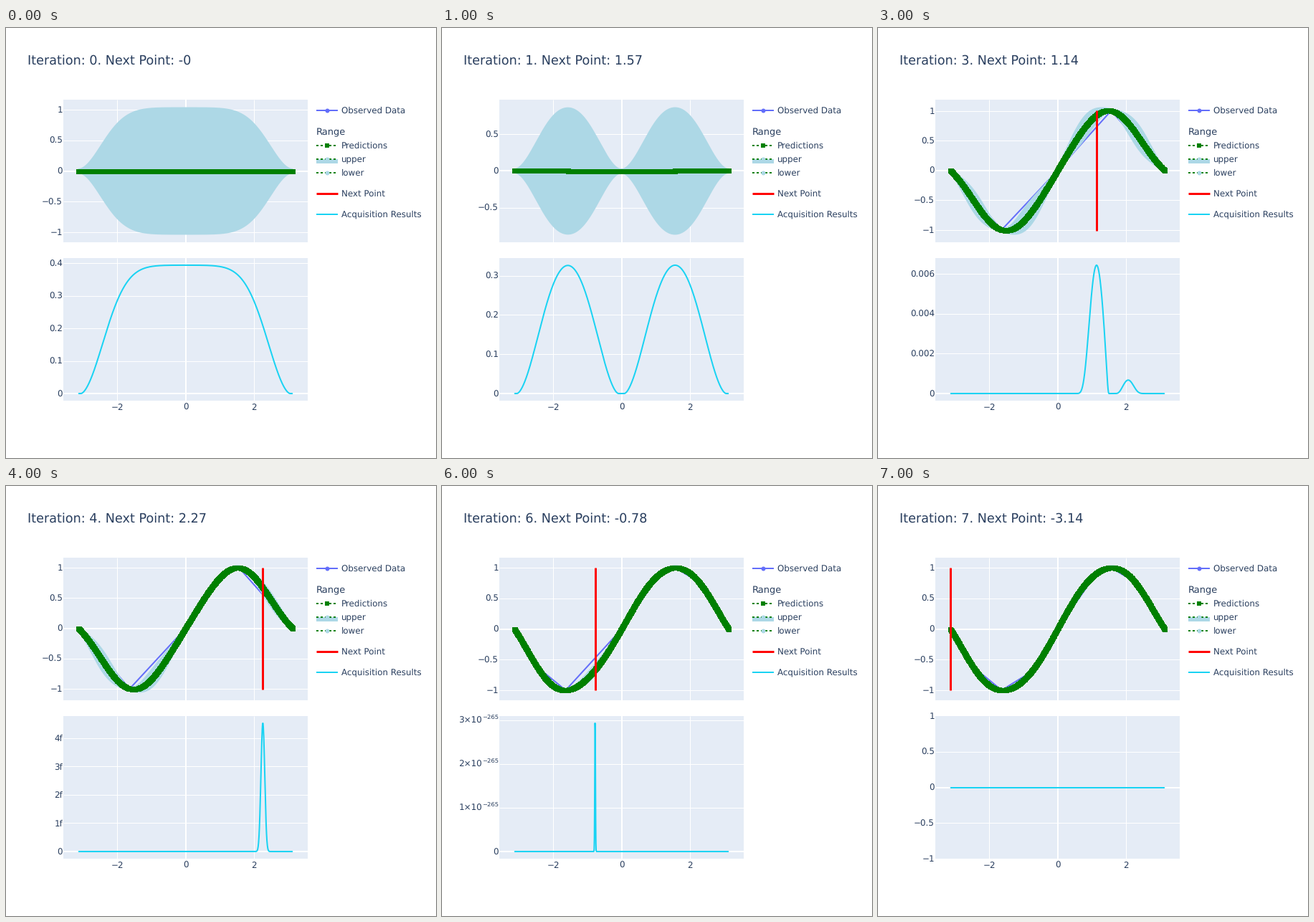
A matplotlib script for the animation above (8000 ms loop, 600 by 600 pixels).

```python
import math

import matplotlib.pyplot as plt
import numpy as np
from matplotlib.animation import FuncAnimation
from matplotlib.patches import Rectangle

plt.rcParams["font.family"] = "DejaVu Sans"
plt.rcParams["text.hinting"] = "none"

SIZE, DPI = 600, 100
PT = 72 / DPI  # points per pixel
STEPS = 8
INK, PANEL = "#2a3f5f", "#e5ecf6"
BLUE, BAND, GREEN, CYAN = "#636efa", "#add8e6", "#008000", "#19d3f3"
LEFT, RIGHT, HEIGHT = 80, 421, 199
TOP_A, TOP_B = 100, 321
MARKER = 7
XS = np.linspace(-math.pi, math.pi, 1000)
SI = {-6: "μ", -9: "n", -12: "p", -15: "f"}

erfc = np.vectorize(math.erfc)


# --- Bayesian optimisation of sin(x) ---

def kernel(a, b):
    return np.exp(-0.5 * (a[:, None] - b[None, :]) ** 2)


def posterior(x, y):
    k = kernel(x, x) + 1e-10 * np.eye(len(x))
    cross = kernel(x, XS)
    solved = np.linalg.solve(k, cross)
    return solved.T @ y, np.maximum(1 - (cross * solved).sum(axis=0), 1e-12)


def expected_improvement(mean, spread, best, xi=0.01):
    gain = mean - best - xi
    z = gain / spread
    pdf = np.exp(-0.5 * z ** 2) / math.sqrt(2 * math.pi)
    ei = gain * 0.5 * erfc(-z / math.sqrt(2)) + spread * pdf
    return np.where(ei > 1e-305, ei, 0)


def optimise():
    x = np.array([-math.pi, math.pi])
    steps = []
    for _ in range(STEPS):
        y = np.sin(x)
        mean, spread = posterior(x, y)
        ei = expected_improvement(mean, spread, y.max())
        nxt = XS[np.argmax(ei)]
        steps.append((x, y, mean, spread, ei, nxt))
        x = np.sort(np.append(x, nxt))
    return steps


# --- drawing, in pixels with y pointing down ---

fig = plt.figure(figsize=(SIZE / DPI, SIZE / DPI), dpi=DPI, facecolor="white")
ax = fig.add_axes([0, 0, 1, 1])


def px(x):
    return 250.5 + 47.59 * np.asarray(x)


def line(x, y, color, width, z, **kw):
    return ax.plot(x, y, color=color, lw=width * PT, zorder=z,
                   solid_capstyle="butt", dash_capstyle="butt", **kw)[0]


def dots(x, y, color, shape, size, z):
    mark = ax.plot(x, y, shape, color=color, ms=size * PT, mew=0, zorder=z)[0]
    mark.set_snap(False)


def text(x, y, s, size=11.85, ha="left"):
    ax.text(x, y, s, fontsize=size * PT, color=INK, ha=ha, va="baseline",
            zorder=9)


def rect(x, y, w, h, color, z):
    ax.add_patch(Rectangle((x, y), w, h, fc=color, lw=0, zorder=z))


class YAxis:
    """Maps values to pixels with automatic range and ticks."""

    def __init__(self, top, lo, hi, pad):
        self.bottom = top + HEIGHT
        if hi > lo:
            self.scale = (HEIGHT - 2 * pad) / (hi - lo)
            self.lo = lo - pad / self.scale
        else:
            self.scale, self.lo = HEIGHT / 2, -1.0
        self.hi = self.lo + HEIGHT / self.scale

    def __call__(self, y):
        return self.bottom - (np.asarray(y) - self.lo) * self.scale

    def ticks(self):
        rough = (self.hi - self.lo) / (HEIGHT / 40 + 1)
        base = 10.0 ** math.floor(math.log10(rough))
        step = base * next(m for m in (2, 5, 10) if m * base >= rough)
        first = math.ceil(self.lo / step - 1e-9)
        last = math.floor(self.hi / step + 1e-9)
        return [i * step for i in range(first, last + 1)]

    def label(self, v):
        y = float(self(v)) + 4.3
        power = math.floor(math.log10(max(-self.lo, self.hi)) + 0.01)
        if v == 0 or abs(power) <= 3:
            s = f"{round(v, 8):g}".replace("-", "−")
            text(79, y, s, ha="right")
        elif power >= -15:
            power = 3 * round((power - 1) / 3)
            text(79, y, f"{v / 10.0 ** power:.4g}{SI[power]}", ha="right")
        else:
            digits = str(-power)
            small = 8.4
            text(79, y - 5, "−" + digits, small, "right")
            width = small * (0.838 + 0.636 * len(digits))
            text(79 - width, y, f"{v / 10.0 ** power:.4g}×10", ha="right")

    def draw(self):
        rect(LEFT, self.bottom - HEIGHT, RIGHT - LEFT, HEIGHT, PANEL, 0)
        for x in (-2, 0, 2):
            line([px(x)] * 2, [self.bottom - HEIGHT, self.bottom], "white",
                 1 if x else 2, 1)
        for v in self.ticks():
            y = float(self(v))
            if self.bottom - HEIGHT + 1 < y < self.bottom - 1:
                line([LEFT, RIGHT], [y, y], "white", 1 if v else 2, 1)
            self.label(v)


def legend():
    ends = [433, 463]
    rows = [(114.5, "Observed Data"), (163.5, "Predictions"), (182.5, "upper"),
            (201.5, "lower"), (230.5, "Next Point"),
            (259.5, "Acquisition Results")]
    for y, name in rows:
        text(468, y + 4.5, name)
    text(433, 149.5, "Range", 13)

    line(ends, [114.5] * 2, BLUE, 2, 6)
    dots([448], [114.5], BLUE, "o", 6, 7)
    rect(433, 182.5, 30, 6, BAND, 5)
    for y, color, shape in ((163.5, GREEN, "s"), (182.5, BAND, "o"),
                            (201.5, BAND, "o")):
        line(ends, [y, y], GREEN, 2, 6, ls=(0, (1.5, 1.5)))
        dots([448], [y], color, shape, 6, 7)
    line(ends, [230.5] * 2, "red", 3, 6)
    line(ends, [259.5] * 2, CYAN, 2, 6)


def draw(i):
    x, y, mean, spread, ei, nxt = steps[i]
    ax.clear()
    ax.set_xlim(0, SIZE)
    ax.set_ylim(SIZE, 0)
    ax.axis("off")

    text(30, 50.3, f"Iteration: {i}. Next Point: {round(nxt, 2):g}", 17.6)
    legend()
    for v in (-2, 0, 2):
        text(px(v), 533.3, str(v).replace("-", "−"), ha="center")

    upper, lower = mean + spread, mean - spread
    fit = YAxis(TOP_A, lower.min(), upper.max(), 14)
    fit.draw()
    line(px(x), fit(y), BLUE, 2, 2)
    dots(px(x), fit(y), BLUE, "o", 6, 2)
    ax.fill_between(px(XS), fit(lower), fit(upper), color=BAND, lw=0, zorder=3)
    for edge in (lower, upper):
        line(px(XS), fit(edge), BAND, MARKER, 3)
    dots(px(XS), fit(mean), GREEN, "s", MARKER, 4)
    if np.ptp(mean) > 0.05:
        line([px(nxt)] * 2, fit([mean.min(), mean.max()]), "red", 3, 5)

    score = YAxis(TOP_B, ei.min(), ei.max(), 0.05 * HEIGHT)
    score.draw()
    line(px(XS), score(ei), CYAN, 2, 4)
    return []


steps = optimise()
anim = FuncAnimation(fig, draw, frames=STEPS, interval=1000, repeat=True,
                     repeat_delay=0)
plt.show()
```
